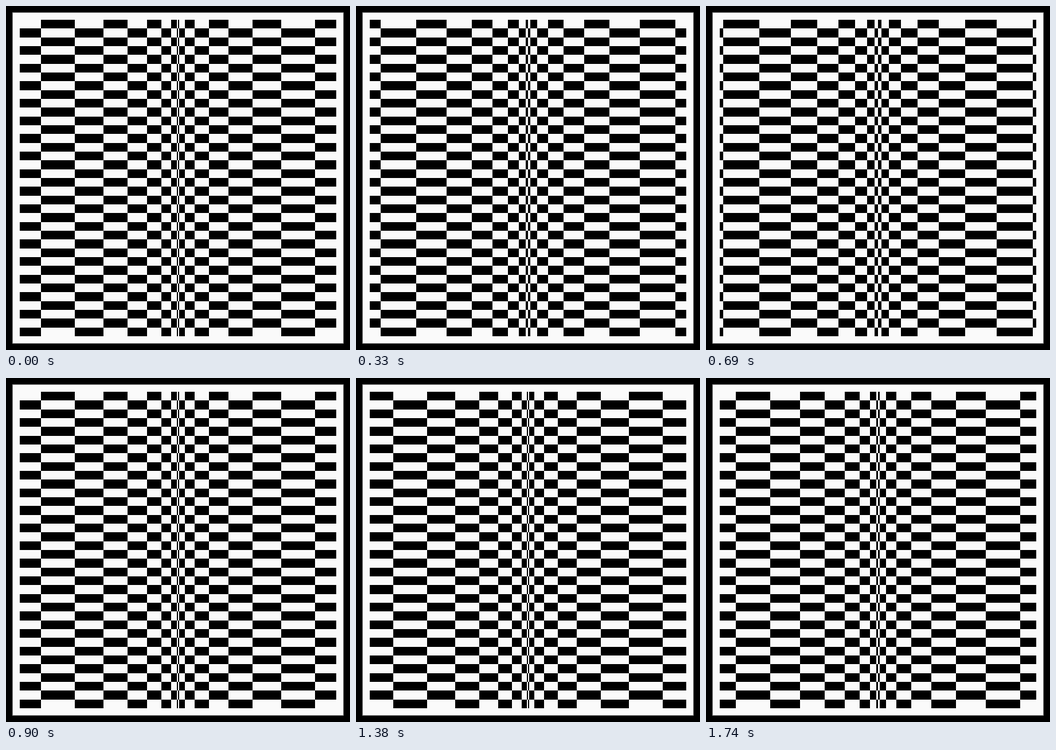
An HTML page without scripts for the animation above (1770 ms loop, 600 px wide and 600 px high).

```html
<!DOCTYPE html>
<html lang="en">
<head>
<meta charset="utf-8">
<title>Converging checkerboard</title>
<style>
@property --step {
  syntax: "<number>";
  inherits: true;
  initial-value: 0;
}
:root { --ink: #000; --paper: #fafafa; --row: calc(46px / 3); }
html, body { margin: 0; width: 100%; height: 100%; overflow: hidden; background: var(--ink); }
.stage {
  position: relative;
  box-sizing: border-box;
  width: 600px;
  height: 600px;
  border: 11px solid var(--ink);
  background: var(--paper);
  box-shadow: inset 0 0 0 1px #8a8a8a;
  animation: run 1770ms steps(59) -1ms infinite;
}
@keyframes run { from { --step: 0; } to { --step: 59; } }

.half { position: absolute; top: 13px; width: 276px; height: 552px; overflow: hidden; }
.left { left: 13px; }
.right { left: 289px; }

/* Stacked layers, widest first; each edge sits at a power of its distance index */
.half b {
  --u: max(0, var(--k) + 0.9 - var(--step) / 15);
  position: absolute;
  top: 0;
  height: 100%;
  width: calc(3.119px * pow(var(--u), 2.1));
  background: repeating-linear-gradient(var(--odd) 0 var(--row), var(--even) 0 calc(2 * var(--row)));
}
.left b { right: 0; }
.right b { left: 0; }
.right b:nth-child(odd), .left b:nth-child(even) { --odd: var(--ink); --even: var(--paper); }
.right b:nth-child(even), .left b:nth-child(odd) { --odd: var(--paper); --even: var(--ink); }
</style>
</head>
<body>
<div class="stage">
  <div class="half left">
    <b style="--k:12"></b><b style="--k:11"></b><b style="--k:10"></b><b style="--k:9"></b><b style="--k:8"></b>
    <b style="--k:7"></b><b style="--k:6"></b><b style="--k:5"></b><b style="--k:4"></b>
    <b style="--k:3"></b><b style="--k:2"></b><b style="--k:1"></b><b style="--k:0"></b>
  </div>
  <div class="half right">
    <b style="--k:12"></b><b style="--k:11"></b><b style="--k:10"></b><b style="--k:9"></b><b style="--k:8"></b>
    <b style="--k:7"></b><b style="--k:6"></b><b style="--k:5"></b><b style="--k:4"></b>
    <b style="--k:3"></b><b style="--k:2"></b><b style="--k:1"></b><b style="--k:0"></b>
  </div>
</div>
</body>
</html>
```
